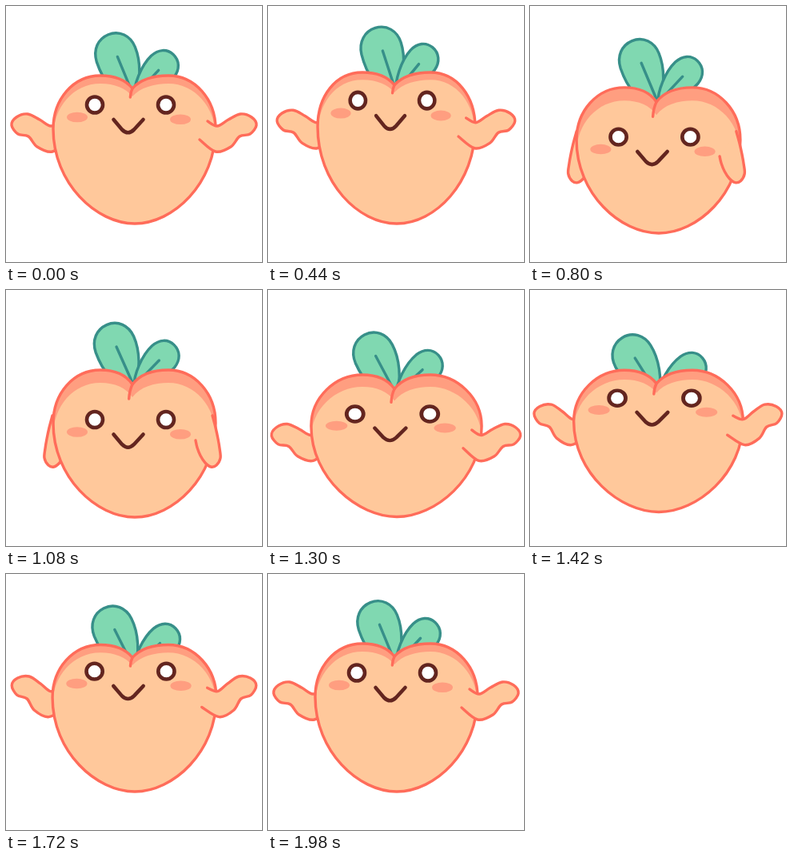
An HTML page for the animation above (2 s loop, 320 px wide and 320 px high).

```html
<!DOCTYPE html>
<html lang="en">
<head>
<meta charset="utf-8">
<title>Bowing peach</title>
<style>
  html, body { margin: 0; width: 100%; height: 100%; overflow: hidden; background: #fff; }
  svg { display: block; width: 100vw; height: 100vh; }
  path, circle { stroke-linecap: round; stroke-linejoin: round; }
  .skin { fill: #ffc89b; }
  .edge { stroke: #ff6c5a; stroke-width: 3.4; }
  .leaf { fill: #80d8b1; stroke: #378f89; stroke-width: 3.4; }
  .face { stroke: #63251f; stroke-width: 4.6; }
  .rim { fill: #ff9e80; }
</style>
</head>
<body>
<svg viewBox="0 0 320 320" fill="none">
  <defs>
    <path id="shape"/>
    <clipPath id="inside"><use href="#shape"/></clipPath>
  </defs>
  <path id="armL" class="skin edge"/>
  <g id="bigLeaf" class="leaf">
    <path d="M0 0C-24 -6 -28 -36 -26.500 -58C-25 -74 -14 -84 0 -84C15 -84 25 -72 25 -57C25 -38 15 -12 0 0Z"/>
    <path d="M0 -54V-3"/>
  </g>
  <g id="smallLeaf" class="leaf">
    <path d="M0 0C-10 -10 -20 -34 -19 -52C-18 -64 -11 -72 0 -72C11 -72 19 -64 20 -52C20 -34 17 -12 0 0Z"/>
    <path d="M0 -45V-3"/>
  </g>
  <g clip-path="url(#inside)">
    <use href="#shape" class="rim"/>
    <use id="light" href="#shape" class="skin"/>
  </g>
  <use href="#shape" class="edge"/>
  <path id="tail" class="edge"/>
  <g id="face">
    <ellipse class="rim" cx="-66.500" cy="15.500" rx="13" ry="6.300"/>
    <ellipse class="rim" cx="62.500" cy="18.300" rx="13" ry="6.300"/>
    <g class="face">
      <circle cx="-44.500" r="10" fill="#fff"/>
      <circle cx="44.500" r="10" fill="#fff"/>
      <path d="M-21 18.500L-10.500 31Q-3 38.500 4.500 31L16 18.500"/>
    </g>
  </g>
  <path id="armFill" class="skin"/>
  <path id="armR" class="edge"/>
</svg>
<script>
const LOOP = 2000;
const $ = id => document.getElementById(id);
const put = (id, name, value) => $(id).setAttribute(name, value);

// wide: body stretch, bow: 0 upright to 1 bent, top: crown height, swing: leaf spread,
// hang: 0 arms out to 1 arms down, turn / slide / drop: arm rotation and offset
const rest = { wide: 1, bow: 0, top: 87, swing: 0, hang: 0, turn: 0, slide: 0, drop: 0 };
const poses = [
  { at: 0, swing: 0.5 },
  { at: 100 },
  { at: 240 },
  { at: 440, wide: 0.97, bow: -0.14, top: 83, swing: -4, turn: -1, slide: -4, drop: -4 },
  { at: 640, wide: 0.975, bow: 0.69, top: 95, swing: -4, hang: 1, turn: -15, slide: -4, drop: -8 },
  { at: 820, wide: 1.01, bow: 1.05, top: 102, swing: 1, hang: 1 },
  { at: 1080, bow: 1, top: 100, swing: 2, hang: 1 },
  { at: 1300, wide: 1.05, bow: 0.82, top: 106, swing: 6, turn: 2, slide: 2, drop: 31 },
  { at: 1540, wide: 1.03, bow: -0.12, top: 93, swing: 13, turn: -16, slide: 6, drop: -4 },
  { at: 1860, swing: -1, turn: -1 },
  { at: LOOP, swing: 0.5 }
].map(pose => ({ ...rest, ...pose }));

// Right arm outline from upper to lower shoulder
const armOut = [[252, 144], [264, 150], [278, 142], [293, 135], [307, 139], [313, 149],
  [305, 160], [292, 163], [281, 176], [262, 182], [242, 167]];
const armDown = [[258, 157], [262, 172], [265, 186], [267, 198], [268, 210], [263, 219],
  [256, 221], [249, 216], [243, 207], [239, 197], [237, 188]];

// Slope at a pose: flat at extremes and holds, smooth elsewhere
function slope(i, name) {
  if (i === 0 || i === poses.length - 1) return 0;
  const rate = j => (poses[j + 1][name] - poses[j][name]) / (poses[j + 1].at - poses[j].at);
  const a = rate(i - 1), b = rate(i);
  return a * b <= 0 ? 0 : 2 * a * b / (a + b);
}

function poseAt(t) {
  const i = poses.findLastIndex(p => p.at <= t);
  const a = poses[i], b = poses[i + 1], span = b.at - a.at;
  const u = (t - a.at) / span, v = 1 - u;
  const pose = {};
  for (const name in rest) {
    pose[name] = a[name] * v * v * (1 + 2 * u) + b[name] * u * u * (3 - 2 * u)
      + span * u * v * (slope(i, name) * v - slope(i + 1, name) * u);
  }
  return pose;
}

// Smooth line through points
function curve(pts) {
  let d = `M${pts[0]}`;
  for (let i = 0; i < pts.length - 1; i++) {
    const p = pts[i], q = pts[i + 1];
    const before = pts[i - 1] || p, after = pts[i + 2] || q;
    const c1 = p.map((v, k) => v + (q[k] - before[k]) / 6);
    const c2 = q.map((v, k) => v - (after[k] - p[k]) / 6);
    d += `C${c1} ${c2} ${q}`;
  }
  return d;
}

function drawBody({ wide, bow, top, swing }) {
  const l = 160.5 - 101.5 * wide, r = 160.5 + 101.5 * wide;
  const bent = Math.min(1, Math.max(0, bow));
  const low = 272 + 12 * Math.sin(bent * Math.PI / 2);
  const h = low - top, side = top + h * 0.36, hip = side + h * 0.37, brow = top + h * 0.16;
  const notch = top + 16 + 2 * bow, tail = 11 + 7 * bow;
  put('shape', 'd', `M158 ${notch}C150 ${top + 6} 136 ${top} 118 ${top}
    C84 ${top} ${l} ${brow} ${l} ${side}C${l} ${hip} 113 ${low} 161 ${low}
    C209 ${low} ${r} ${hip} ${r} ${side}C${r} ${brow} 236 ${top} 203 ${top}
    C185 ${top} 168 ${top + 5} 158 ${notch}Z`);
  put('light', 'transform', `translate(0 ${10 + 6 * bow})`);
  put('tail', 'd', `M158 ${notch}q${-tail * 0.2} ${tail * 0.4} ${-tail * 0.24} ${tail}`);
  put('face', 'transform', `translate(155.5 ${123.5 + 38.5 * bow}) scale(${wide} ${1 / wide})`);

  const base = `translate(160 ${notch + 10 - 9 * bow + 0.65 * swing})`;
  put('bigLeaf', 'transform', `${base} rotate(${-22 - swing})`);
  put('smallLeaf', 'transform', `${base} rotate(${42.5 + 0.8 * swing})`);
}

function drawArms({ hang, turn, slide, drop }) {
  const cos = Math.cos(turn * Math.PI / 180), sin = Math.sin(turn * Math.PI / 180);
  const pts = armOut.map((p, i) => {
    const [x, y] = p.map((v, k) => v + (armDown[i][k] - v) * hang);
    const dx = x - 250, dy = y - 165;
    return [250 + slide + dx * cos - dy * sin, 165 + drop + dx * sin + dy * cos];
  });
  const right = curve(pts);
  put('armFill', 'd', right + 'Z');
  put('armR', 'd', right);
  put('armL', 'd', curve(pts.map(([x, y]) => [320 - 4 * hang - x, y])));
}

const start = performance.now();
function frame(now) {
  const pose = poseAt(Math.max(0, now - start) % LOOP);
  drawBody(pose);
  drawArms(pose);
  requestAnimationFrame(frame);
}
frame(start);
</script>
</body>
</html>
```
